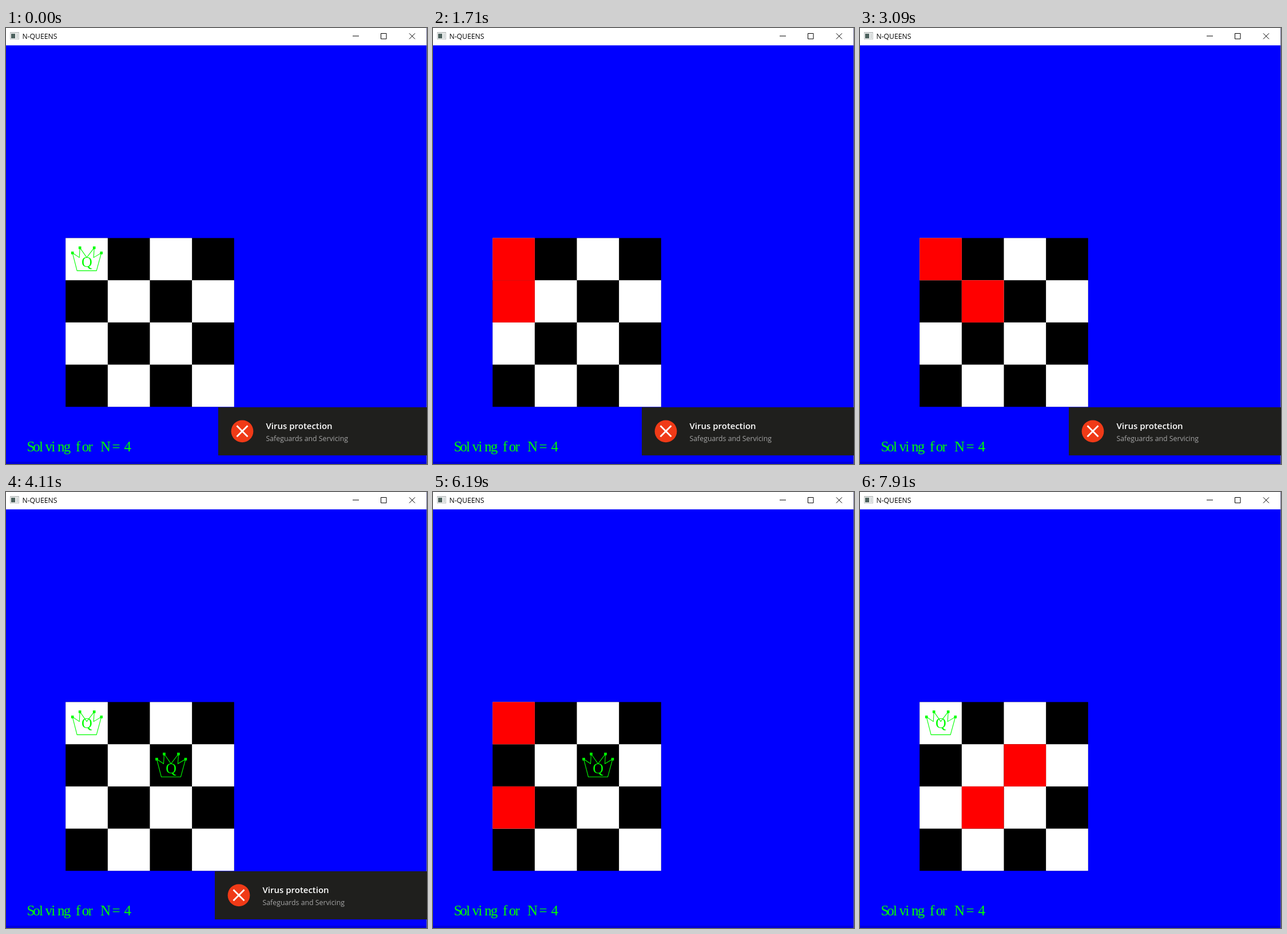
An HTML page with a canvas that plays this animation: 736x761 px, repeating every 8 s.

```html
<!DOCTYPE html>
<html lang="en">
<head>
<meta charset="utf-8">
<title>N-QUEENS</title>
<style>
html, body { margin: 0; height: 100%; overflow: hidden; background: #00f; }
canvas { display: block; }
</style>
</head>
<body>
<canvas id="stage" width="736" height="761"></canvas>
<script>
const ctx = document.getElementById('stage').getContext('2d');
const LOOP = 8000, CELL = 73.65, LEFT = 104.2, TOP = 366.6;
const GREEN = '#00ff00';
const SANS = '"Open Sans", "Noto Sans", sans-serif';
const SERIF = '"Liberation Serif", serif';

// [start ms, toast x, queens]; a queen is row, column and
// '+' just placed, '!' in conflict, nothing once redrawn
const STEPS = [
  [0, 371, '00+'],
  [350, 365, '00+'],
  [1030, 365, '00+ 10+'],
  [1710, 365, '00! 10!'],
  [2050, 365, '00 10'],
  [2750, 365, '00 11+'],
  [3090, 365, '00! 11!'],
  [3780, 365, '00 11'],
  [4110, 365, '00 12+'],
  [5850, 690, '00 12+ 20+'],
  [6190, 736, '00! 12+ 20!'],
  [6880, 736, '00 12+ 20'],
  [7230, 736, '00 12+ 21+'],
  [7910, 736, '00 12! 21!']
];

const CROWN = [[12, 26], [20, 57], [54, 57], [62.5, 26], [49, 34],
               [50, 17], [37, 34], [25, 17], [24, 34]];
const TIPS = [0, 3, 5, 7];

function rect(x, y, w, h, color) {
  ctx.fillStyle = color;
  ctx.fillRect(x, y, w, h);
}

function text(str, x, y, font, color) {
  ctx.font = font;
  ctx.fillStyle = color;
  ctx.fillText(str, x, y);
}

function path(points, color, width, close) {
  ctx.beginPath();
  points.forEach(([x, y]) => ctx.lineTo(x, y));
  if (close) ctx.closePath();
  ctx.strokeStyle = color;
  ctx.lineWidth = width;
  ctx.stroke();
}

function cross(x, y, r, color, width) {
  path([[x - r, y - r], [x + r, y + r]], color, width);
  path([[x - r, y + r], [x + r, y - r]], color, width);
}

function cell(row, col, color) {
  rect(LEFT + col * CELL, TOP + row * CELL, CELL, CELL, color);
}

function board() {
  rect(LEFT, TOP, 4 * CELL, 4 * CELL, '#000');
  for (let i = 0; i < 16; i++) {
    const row = i >> 2, col = i & 3;
    if ((row + col) % 2 === 0) cell(row, col, '#fff');
  }
}

function frame() {
  rect(0, 0, 736, 761, '#00f');
  rect(0, 757, 736, 4, '#0000dc');
  rect(0, 0, 736, 30.3, '#fff');
  rect(735, 0, 1, 761, '#6a6a90');
  rect(7, 7, 16, 13, '#c4c8c8');
  rect(8, 9, 14, 10, '#f0f2f2');
  rect(9, 10, 7, 8, '#4d625e');
  rect(18, 10, 3, 8, '#d3d8d8');
  text('N-QUEENS', 28.5, 18.5, '12.2px ' + SANS, '#000');
  rect(606, 13.5, 11, 1, '#000');
  path([[655.5, 9.5], [665, 9.5], [665, 19], [655.5, 19]], '#000', 1, true);
  cross(710, 14.3, 5, '#000', 1);
}

function caption() {
  const font = '25px ' + SERIF;
  [...'Solving for'].forEach((ch, i) => text(ch, 36.5 + i * 10.7, 739, font, GREEN));
  text('N', 165, 739, font, GREEN);
  text('=', 185.5, 739, font, GREEN);
  text('4', 206.5, 739, font, GREEN);
}

function queen(row, col, fresh) {
  const x = LEFT + col * CELL, y = TOP + row * CELL;
  const pts = CROWN.map(([px, py]) => [x + px, y + py]);
  path(pts, GREEN, 1.1, true);
  TIPS.forEach(i => rect(pts[i][0] - 2.3, pts[i][1] - 2.3, 4.6, 4.6, GREEN));
  text('Q', x + 27.7, y + (fresh ? 50.3 : 45.5), '26px ' + SERIF, GREEN);
}

function toast(x) {
  rect(x, 662, 736 - x, 84, '#1f1f1d');
  ctx.fillStyle = '#f03a17';
  ctx.beginPath();
  ctx.arc(x + 42, 703.8, 19.4, 0, 7);
  ctx.fill();
  cross(x + 42, 703.8, 9.5, '#fff', 2.8);
  text('Virus protection', x + 83.5, 699.5, '600 15px ' + SANS, '#fff');
  text('Safeguards and Servicing', x + 83.5, 721, '12.3px ' + SANS, '#a5a5a5');
}

function draw() {
  const t = performance.now() % LOOP;
  const [, toastX, queens] = STEPS.findLast(step => step[0] <= t);
  frame();
  caption();
  board();
  for (const [row, col, mark] of queens.split(' ')) {
    if (mark === '!') cell(+row, +col, '#f00');
    else queen(+row, +col, mark === '+');
  }
  if (toastX < 736) toast(toastX);
  requestAnimationFrame(draw);
}
draw();
</script>
</body>
</html>
```
